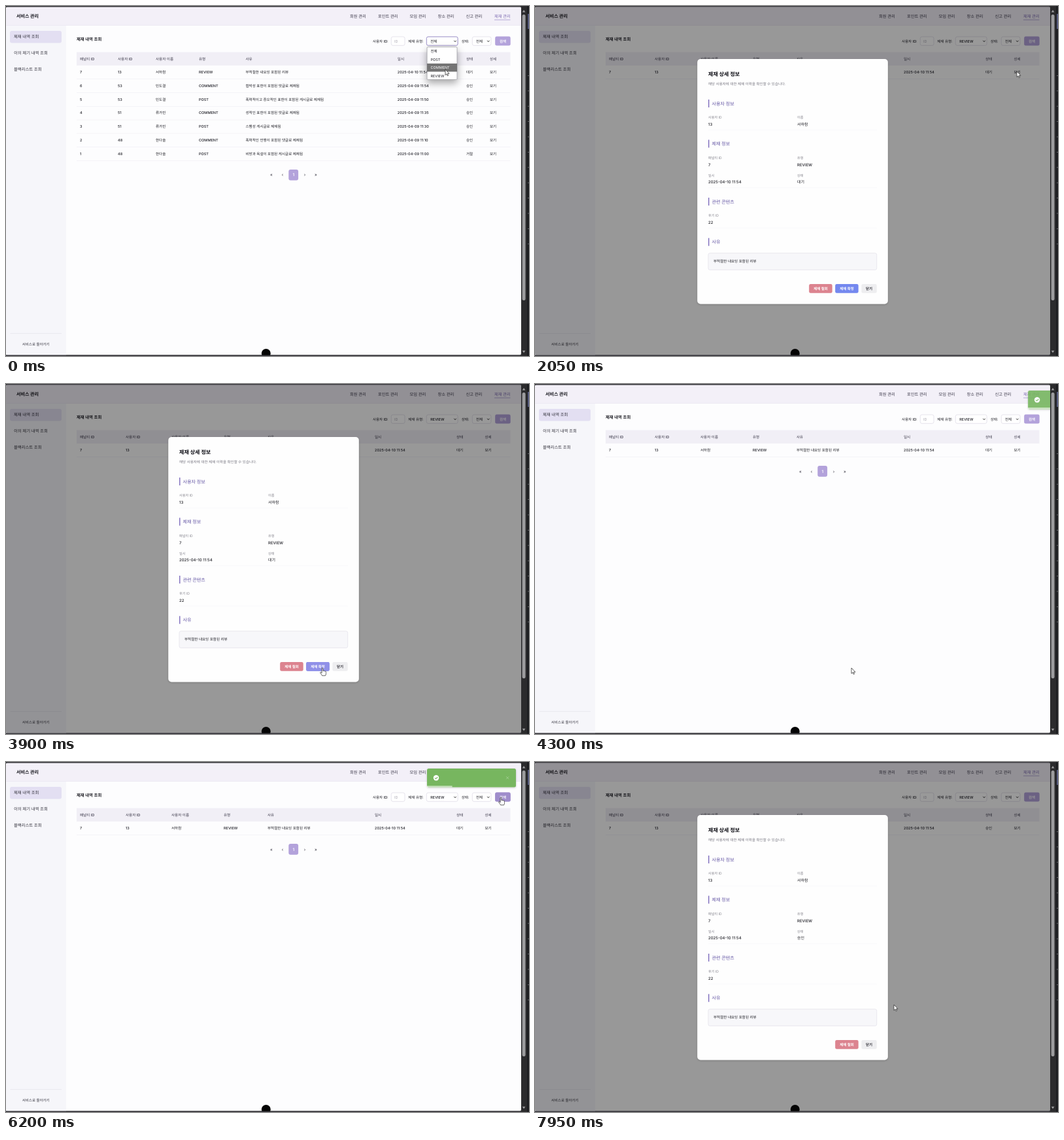
Recreate the animation shown at these times as an HTML page. Size 800 by 535 pixels, loop 8000 ms.

```html
<!DOCTYPE html>
<html lang="ko">
<head>
<meta charset="utf-8">
<title>서비스 관리</title>
<style>
html, body { margin: 0; width: 100%; height: 100%; overflow: hidden; background: #2b2b2d; }
svg { display: block; }
text { font-family: Inter, "Noto Sans CJK KR", "Noto Sans CJK", sans-serif; text-rendering: geometricPrecision; white-space: pre; }

/* One loop is 8 s, so 1% is 80 ms. */
.menu, .pick-comment, .pick-review, .type-all, .type-review, .focus, .table-all, .table-review,
.search-hover, .confirm-hover, .modal, .before, .after, .arrow, .hand { animation: 8s step-end infinite; }
.menu { animation-name: menu; }
.pick-comment { animation-name: pick-comment; }
.pick-review { animation-name: pick-review; }
.type-all { animation-name: menu; }
.type-review { animation-name: type-review; }
.focus { animation-name: focus; }
.table-all { animation-name: table-all; }
.table-review { animation-name: table-review; }
.search-hover { animation-name: search-hover; }
.confirm-hover { animation-name: confirm-hover; }
.modal { animation-name: modal; }
.before { animation-name: before; }
.after { animation-name: after; }
.arrow { animation-name: arrow; }
.hand { animation-name: hand; }
@keyframes menu { 0% { opacity: 1 } 5.6%, 100% { opacity: 0 } }
@keyframes type-review { 0% { opacity: 0 } 5.6%, 100% { opacity: 1 } }
@keyframes pick-comment { 0% { opacity: 1 } 2.5%, 100% { opacity: 0 } }
@keyframes pick-review { 0% { opacity: 0 } 2.5%, 100% { opacity: 1 } }
@keyframes focus { 0% { opacity: 1 } 13%, 100% { opacity: 0 } }
@keyframes table-all { 0% { opacity: 1 } 14.3%, 100% { opacity: 0 } }
@keyframes table-review { 0% { opacity: 0 } 14.3%, 100% { opacity: 1 } }
@keyframes search-hover { 0%, 18.7%, 82.5%, 100% { opacity: 0 } 11.2%, 72% { opacity: 1 } }
@keyframes confirm-hover { 0%, 49.25%, 100% { opacity: 0 } 41.5% { opacity: 1 } }
@keyframes modal { 0%, 49.25% { opacity: 0 } 22.5%, 93.1%, 100% { opacity: 1 } }
@keyframes before { 0% { opacity: 1 } 80%, 100% { opacity: 0 } }
@keyframes after { 0% { opacity: 0 } 80%, 100% { opacity: 1 } }
@keyframes hand {
  0%, 18.7%, 22.5%, 49.3%, 82.5%, 93.1%, 100% { opacity: 0 }
  11.2%, 20.2%, 41.5%, 72%, 88% { opacity: 1 }
}
@keyframes arrow {
  0%, 18.7%, 22.5%, 49.3%, 82.5%, 93.1%, 100% { opacity: 1 }
  11.2%, 20.2%, 41.5%, 72%, 88% { opacity: 0 }
}

.cursor { animation: move 8s ease-in-out infinite; }
@keyframes move {
  0% { transform: translate(672px, 97px) }
  4%, 6.5% { transform: translate(669px, 104px) }
  11.6%, 18% { transform: translate(746px, 57px) }
  20.6%, 29% { transform: translate(737px, 100px) }
  42.5%, 56% { transform: translate(484px, 434px) }
  73%, 82% { transform: translate(757px, 54px) }
  88.8%, 94% { transform: translate(737px, 100px) }
  98.8%, 100% { transform: translate(549px, 371px) }
}

.toast { animation: toast 8s cubic-bezier(.215, .61, .355, 1) infinite; }
@keyframes toast {
  0%, 50.65% { transform: translateX(1275px); opacity: 0 }
  56.28% { transform: translateX(-10.6px); opacity: 1 }
  57.68% { transform: translateX(4.2px) }
  59.09% { transform: translateX(-2.1px) }
  60.03% { transform: translateX(0); opacity: 1 }
  88.15% { transform: translateX(0); opacity: 1; animation-timing-function: ease }
  90.03% { transform: translateX(-8.5px); opacity: 1; animation-timing-function: ease }
  97.53%, 100% { transform: translateX(850px); opacity: 0 }
}
.progress { animation: progress 8s linear infinite; transform-origin: 0 0; }
@keyframes progress {
  0%, 50.65% { transform: scaleX(1) }
  88.15%, 100% { transform: scaleX(0) }
}
</style>
</head>
<body>
<script>
const INK = '#1f1f26', PURPLE = '#b3a2db', LINE = '#efedf3';

// y is the vertical middle of the text
const text = (x, y, s, size = 5.55, fill = INK, weight = 500, anchor = 'start') =>
  `<text x="${x}" y="${y + size * .36}" font-size="${size}" fill="${fill}" font-weight="${weight}" text-anchor="${anchor}">${s}</text>`;
const box = (x, y, w, h, fill, r = 0, stroke = 'none') =>
  `<rect x="${x}" y="${y}" width="${w}" height="${h}" rx="${r}" fill="${fill}" stroke="${stroke}" stroke-width=".7"/>`;
const rule = (x, y, w, color = LINE) => box(x, y, w, .6, color);
const group = (cls, ...parts) => `<g class="${cls}">${parts.join('')}</g>`;
const chevron = (x, y) =>
  `<path d="M${x - 1.7} ${y - 1}l1.7 1.9 1.7-1.9" fill="none" stroke="#222" stroke-width=".9"/>`;
const button = (x, y, w, h, fill, label, color = '#fff') =>
  box(x, y, w, h, fill, 2.4) + text(x + w / 2, y + h / 2, label, 5.5, color, 600, 'middle');
const status = (x, y, size) =>
  group('before', text(x, y, '대기', size)) + group('after', text(x, y, '승인', size));

function frame() {
  const side = ['제재 내역 조회', '이의 제기 내역 조회', '블랙리스트 조회'];
  const nav = [['회원 관리', 526], ['포인트 관리', 569], ['모임 관리', 617.5], ['장소 관리', 660.5], ['신고 관리', 703.5]];
  return box(0, 1.5, 788, 532, '#fdfdfe', 2) +
    box(0, 1.5, 788, 28, '#f3f0f8', 2) + rule(0, 29.3, 788, '#e6e1ee') +
    box(0, 30, 92, 503.5, '#f6f6fa') +
    text(16, 15.5, '서비스 관리', 7.05, '#15151c', 700) +
    nav.map(([s, x]) => text(x, 15.5, s, 6.3, '#3b3849')).join('') +
    text(747, 15.5, '제재 관리', 6.3, '#8271b5') + box(747, 20.7, 24.5, .8, '#a597d0') +
    box(6, 38, 79, 18.5, '#e3dff2', 3) +
    side.map((s, i) => text(12, 47 + 25 * i, s, 6.35, '#33323d')).join('') +
    rule(6.5, 500, 78.5, '#e3e2ea') +
    text(45.7, 517, '서비스로 돌아가기', 5.5, '#33323d', 500, 'middle') +
    text(108, 51, '제재 내역 조회', 6.35, INK, 600);
}

function filters() {
  return text(561, 53.7, '사용자 ID:', 5.5) +
    box(589.3, 47, 20.7, 13.3, '#fff', 2.5, '#dcd9e4') + text(594, 53.7, 'ID', 5.5, '#aaa8b3', 400) +
    text(615.3, 53.7, '제재 유형:', 5.5) +
    box(643.3, 47, 47.8, 13.3, '#fff', 2.5, '#dcd9e4') +
    group('focus', box(643.3, 47, 47.8, 13.3, 'none', 2.5, '#8273bd')) +
    group('type-all', text(649.3, 53.7, '전체', 5.5)) +
    group('type-review', text(649.3, 53.7, 'REVIEW', 5.5)) + chevron(687, 53.8) +
    text(696.7, 53.7, '상태:', 5.5) +
    box(713.3, 47, 28.7, 13.3, '#fff', 2.5, '#dcd9e4') + text(719, 53.7, '전체', 5.5) + chevron(737.8, 53.8) +
    button(748.2, 46.6, 23.5, 14, PURPLE, '검색') +
    group('search-hover', button(748.2, 46.6, 23.5, 14, '#9f8dcb', '검색'));
}

function table(cls, columns, rows) {
  const heads = ['패널티 ID', '사용자 ID', '사용자 이름', '유형', '사유', '일시', '상태', '상세'];
  const pageY = 112.6 + 20.8 * rows.length;
  const line = (row, i) => {
    const y = 101 + 20.8 * i;
    return row.map((s, c) => s ? text(columns[c], y, s) : status(columns[c], y)).join('') + rule(108, y + 10.4, 663.5);
  };
  return group(cls,
    box(108, 70.5, 663.5, 20.5, '#f1eff6'),
    heads.map((s, c) => text(columns[c], 80.8, s, 5.55, '#3b3849')).join(''),
    rows.map(line).join(''),
    [['«', 406], ['‹', 423], ['›', 457], ['»', 474]].map(([s, x]) => text(x, pageY, s, 6.2, '#44424e', 500, 'middle')).join(''),
    box(432.3, pageY - 8.3, 14.8, 16.6, PURPLE, 3),
    text(439.7, pageY, '1', 6.2, '#fff', 600, 'middle'));
}

function tables() {
  const review = '부적절한 내요잉 포함된 리뷰', names = { 51: '류가빈', 53: '민도결', 48: '한다솔' };
  const rows = [
    [53, 'COMMENT', '협박성 표현이 포함된 댓글로 제재됨', '54', '승인'],
    [53, 'POST', '폭력적이고 증오적인 표현이 포함된 게시글로 제재됨', '50', '승인'],
    [51, 'COMMENT', '성적인 표현이 포함된 댓글로 제재됨', '35', '승인'],
    [51, 'POST', '스팸성 게시글로 제재됨', '30', '승인'],
    [48, 'COMMENT', '폭력적인 언행이 포함된 댓글로 제재됨', '10', '승인'],
    [48, 'POST', '비방과 욕설이 포함된 게시글로 제재됨', '00', '거절']
  ].map(([id, type, why, min, state], i) => [6 - i, id, names[id], type, why, `2025-04-09 11:${min}`, state, '보기']);
  const first = ['7', '13', '서하람', 'REVIEW', review, '2025-04-10 11:54', null, '보기'];
  return table('table-all', [113, 171, 229, 295, 366.5, 598.8, 704, 740], [first, ...rows]) +
    table('table-review', [113, 183, 253, 333, 400, 564, 689, 732.5], [first]);
}

function menu() {
  const pick = (cls, y, s) => group(cls, box(644, y - 6.3, 46, 12.5, '#747474'), text(649.5, y, s, 5.5, '#fff', 400));
  return group('menu',
    `<g filter="url(#menuShadow)">${box(644, 62.6, 46, 50, '#fff', 1.5, '#8b8b90')}</g>`,
    ['전체', 'POST', 'COMMENT', 'REVIEW'].map((s, i) => text(649.5, 69.2 + 12.5 * i, s, 5.5, INK, 400)).join(''),
    pick('pick-comment', 94.2, 'COMMENT'), pick('pick-review', 106.4, 'REVIEW'));
}

function modal() {
  const section = (y, s) => box(265, y - 6, 1.5, 12, '#8574c0') + text(270.5, y, s, 7.05, '#6557a5');
  const label = (x, y, s) => text(x, y, s, 5.15, '#84838c', 400);
  const field = (x, y, name, value) => label(x, y, name) + text(x, y + 10.5, value, 6);
  const revoke = x => button(x, 425, 35.5, 13.8, '#dc838f', '제재 철회');
  return group('modal',
    box(0, 1.5, 788, 532, 'rgba(0,0,0,.4)', 2),
    `<g filter="url(#soft)">${box(248.3, 81, 291.5, 374.5, '#fefefe', 5)}</g>`,
    text(265, 104, '제재 상세 정보', 8.05, '#111118', 700),
    text(265, 119, '해당 사용자에 대한 제재 이력을 확인할 수 있습니다.', 5.5, '#777680', 400),
    section(149, '사용자 정보'),
    field(265, 170.5, '사용자 ID', '13'), field(401, 170.5, '이름', '서하람'),
    section(210.5, '제재 정보'),
    field(265, 232, '패널티 ID', '7'), field(401, 232, '유형', 'REVIEW'),
    field(265, 258.7, '일시', '2025-04-10 11:54'), label(401, 258.7, '상태'), status(401, 269.2, 6),
    section(299, '관련 콘텐츠'), field(265, 320, '후기 ID', '22'),
    [189.5, 277.5, 339].map(y => rule(265, y, 258, '#f5f5f8')).join(''),
    section(360.7, '사유'),
    box(265, 377.8, 257.7, 25.5, '#f7f7fa', 2.5, '#e1e0e8'), text(273, 390.5, '부적절한 내요잉 포함된 리뷰'),
    group('before', revoke(419.2), button(459.2, 425, 35.5, 13.8, '#7488ef', '제재 확정'),
      group('confirm-hover', button(459.2, 425, 35.5, 13.8, '#9090e8', '제재 확정'))),
    group('after', revoke(459.2)),
    button(499.3, 425, 23.5, 13.8, '#eeeef0', '닫기', '#33323a'));
}

function toast() {
  return `<g clip-path="url(#page)">` + group('toast',
    `<g filter="url(#soft)">${box(644, 10, 136, 28.5, '#77b65f', 2.5)}</g>`,
    `<circle cx="658" cy="24.2" r="4.2" fill="#fff"/>`,
    `<path d="M656 24.3l1.5 1.5 2.7-2.8" fill="none" stroke="#77b65f" stroke-width="1.1"/>`,
    `<path d="M765.2 22.2l4 4m0-4l-4 4" stroke="#a9d19a" stroke-width=".8"/>`,
    `<g transform="translate(644 36.4)"><rect class="progress" width="136" height="2.1" fill="#fff" opacity=".6"/></g>`) + '</g>';
}

function chrome() {
  const ticks = Array.from({ length: 12 }, (_, i) => box(798, 106 + i * 23.4, 2, .8, '#77777c')).join('');
  return `<circle cx="397.8" cy="531" r="7" fill="#050505"/>` +
    box(0, 0, 800, 1.4, '#38373c') + box(0, 533.6, 800, 1.4, '#36353b') +
    box(788, 0, 12, 535, '#2b2b2d') + box(789.6, 13, 5, 437, '#9c9c9e', 2.5) +
    `<path d="M789.8 9.5l2.3-3.4 2.3 3.4zM789.8 526.8l2.3 3.4 2.3-3.4z" fill="#a0a0a2"/>` +
    box(797, 0, 3, 535, '#1d1e21') + box(798, 12, 2, 23, '#55597c') + ticks;
}

function cursor() {
  const outline = 'fill="#fff" stroke="#222" stroke-width=".7" stroke-linejoin="round"';
  return group('cursor',
    `<path class="arrow" d="M0 0V8.6L2 6.8 3.3 9.8 4.6 9.2 3.3 6.3H6Z" ${outline}/>`,
    `<path class="hand" d="M-.9.9Q-.9 0 0 0T.9.9V4.6Q1.9 3.9 2.6 4.8 3.7 4.2 4.2 5.2 5.6 4.9 5.6 6.4V8.6Q5.4 10.2 4.6 11.8H-.4Q-1.4 9.9-3.3 7.7-3.7 6.4-2.3 6.6L-.9 7.8Z" ${outline}/>`);
}

document.body.innerHTML = `<svg width="800" height="535" viewBox="0 0 800 535">
  <defs>
    <clipPath id="page"><rect y="1.5" width="788" height="532"/></clipPath>
    <filter id="soft" x="-10%" y="-30%" width="120%" height="170%"><feDropShadow dx="0" dy="1" stdDeviation="1.8" flood-opacity=".2"/></filter>
    <filter id="menuShadow" x="-50%" y="-50%" width="200%" height="220%"><feDropShadow dx="0" dy="5" stdDeviation="6" flood-opacity=".35"/></filter>
  </defs>
  ${frame()}${filters()}${tables()}${menu()}${modal()}${toast()}${chrome()}${cursor()}
</svg>`;
</script>
</body>
</html>
```
